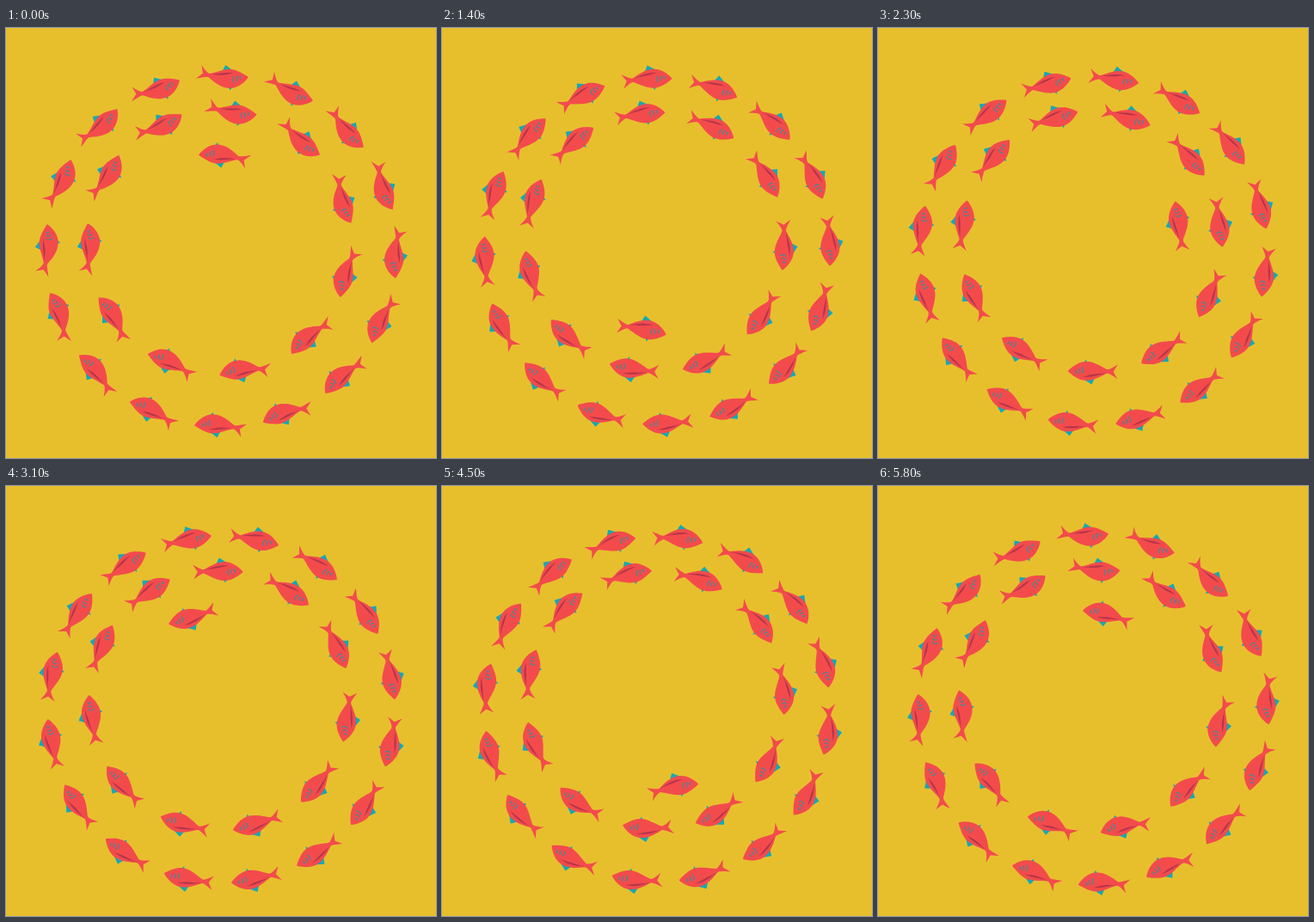
Animation, 500 px wide and 500 px high, one loop 5900 ms. Source, as an HTML page with a canvas:

```html
<!DOCTYPE html>
<html lang="en">
<head>
<meta charset="utf-8">
<title>Circling fish</title>
<style>
  html, body { margin: 0; width: 100%; height: 100%; overflow: hidden; background: #e7bf2d; }
  canvas { display: block; }
</style>
</head>
<body>
<canvas id="sea" width="500" height="500"></canvas>
<script>
const ctx = document.getElementById('sea').getContext('2d');
const LOOP = 5900, STEP = 100;
const TURN = 6.14;   // degrees per step
const SWINGS = 7;    // tail beats per turn
const SAND = '#e7bf2d', RED = '#f34b4c', SHADE = '#b5354a', TEAL = '#12a9b6', MARK = '#4a8792';
const NOSE = 30, JOINT = -16, TIP = -28;

const rings = [
  { x: 250.4, y: 259.6, r: 202, count: 16, start: 0.4, speed: 1, flip: false },
  { x: 248.2, y: 249, r: 151, count: 11, start: 5.1, speed: 1, flip: false },
  { x: 250, y: 249, r: 101, count: 1, start: 2.3, speed: -2, flip: true }
];

const rad = deg => deg * Math.PI / 180;

// Half the height of the fish at x: a spindle, then the flaring tail.
function girth(x) {
  if (x < JOINT) return 2 + 6.5 * ((JOINT - x) / (JOINT - TIP)) ** 1.3;
  const t = (x - JOINT) / (NOSE - JOINT);
  return 2 * (1 - t) + 10.1 * Math.sin(Math.PI * Math.min(1, t ** 1.15)) ** 0.9;
}

// Moves a point of the straight fish onto its curved spine.
function bend(x, y, swing) {
  const u = (8 - x) / 35;
  const slope = swing * 13 * u / 35;
  return [x - y * Math.sin(slope), y * Math.cos(slope) - swing * 6.5 * u * u];
}

// Points along the fish at a share of its girth; negative shares are the back.
function edge(from, to, share) {
  const steps = 32;
  return Array.from({ length: steps + 1 }, (_, i) => {
    const x = from + (to - from) * i / steps;
    return [x, girth(x) * (typeof share === 'function' ? share(i / steps) : share)];
  });
}

function trace(points, swing) {
  const path = new Path2D();
  for (const [x, y] of points) path.lineTo(...bend(x, y, swing));
  return path;
}

function arc(x, y, half) {
  return Array.from({ length: 9 }, (_, i) => {
    const v = i / 4 - 1;
    return [x + 1.6 * v * v, y + half * v];
  });
}

function drawFish(swing) {
  const fill = (points, color) => {
    ctx.fillStyle = color;
    ctx.fill(trace(points, swing));
  };
  fill([[-1, -9], [2, -15.5], [12, -9.5]], TEAL);
  fill([[7, 9], [9, 13.5], [12, 9]], TEAL);
  fill([...edge(TIP, NOSE, -1), ...edge(NOSE, TIP, 1), [-23, 0]], RED);

  const thick = t => -0.62 + 0.24 * Math.sin(Math.PI * t);
  fill([...edge(JOINT, 13, -0.62), ...edge(13, JOINT, thick)], SHADE);

  ctx.strokeStyle = MARK;
  ctx.lineWidth = 1.2;
  for (let i = 0; i < 3; i++) ctx.stroke(trace(arc(12 + 4 * i, 1 - i, 3.5 - 0.9 * i), swing));
}

function draw(now) {
  const angle = Math.floor(now % LOOP / STEP) * TURN;
  const swing = Math.cos(rad(angle * SWINGS + 6));

  ctx.fillStyle = SAND;
  ctx.fillRect(0, 0, 500, 500);
  for (const ring of rings) {
    for (let i = 0; i < ring.count; i++) {
      ctx.save();
      ctx.translate(ring.x, ring.y);
      ctx.rotate(rad(ring.start + angle * ring.speed + i * 360 / ring.count));
      ctx.translate(0, -ring.r);
      ctx.rotate(rad(ring.flip ? 181.5 : 1.5));
      ctx.translate(0, 1);
      drawFish(swing);
      ctx.restore();
    }
  }
  requestAnimationFrame(draw);
}
requestAnimationFrame(draw);
</script>
</body>
</html>
```
